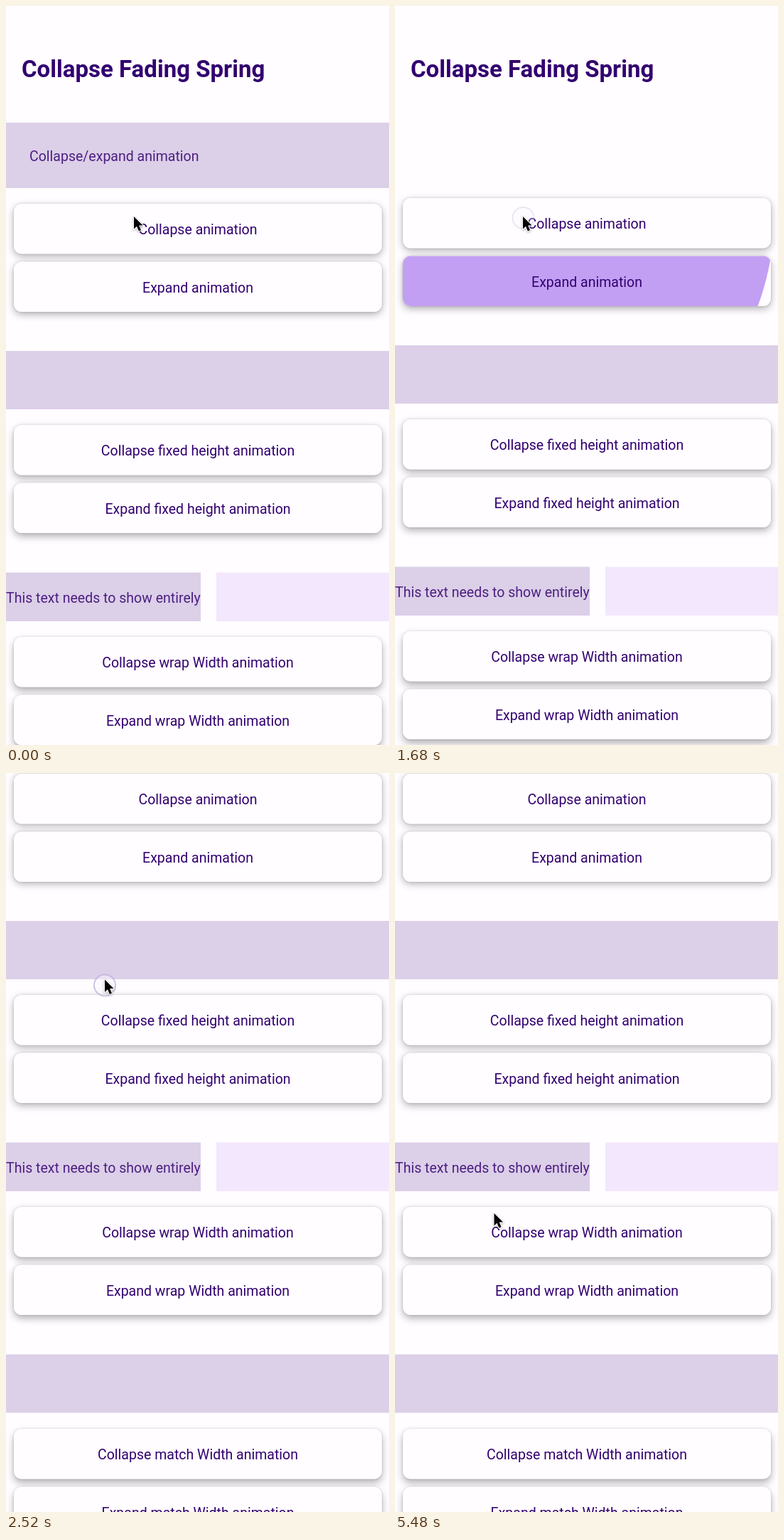
Animation of 539x1039 px, one loop 5.52 s. Source, as an HTML page with a canvas:

```html
<!DOCTYPE html>
<html lang="en">
<head>
<meta charset="utf-8">
<title>Collapse Fading Spring</title>
<style>
html, body { margin: 0; height: 100%; overflow: hidden; background: #fffdff; }
canvas { display: block; width: 539px; height: 1039px; }
</style>
</head>
<body>
<canvas width="539" height="1039"></canvas>
<script>
const W = 539, H = 1039, LOOP = 5520;
const INK = '#320070', PAPER = '#fffdff', PANEL = '#dccfe8', PALE = '#f3e7fd';
const ctx = document.querySelector('canvas').getContext('2d');
const clamp = (v, lo = 0, hi = 1) => Math.min(hi, Math.max(lo, v));
const smooth = u => u * u * (3 - 2 * u);

// Critically damped spring from 0 to 1, stiffness 1500
function spring(ms) {
  if (ms <= 0) return 0;
  const a = Math.sqrt(1500) * ms / 1000;
  return 1 - (1 + a) * Math.exp(-a);
}

// Taps by release time; the ripple starts PRESS ms earlier
const PRESS = 260, NEXT = 210;
const taps = [
  { up: 593, x: 181, y: 298, button: 0 },
  { up: 1578, x: 181, y: 298, button: 1 },
  { up: 3266, x: 140, y: 656, button: 4 },
  { up: 4250, x: 127, y: 725, button: 5 }
];

// Cursor moves: start, end, x, y
const moves = [
  [1700, 2040, 139, 586],
  [2100, 2500, 139, 290.5],
  [2600, 2880, 140, 656],
  [3760, 3970, 126, 724],
  [4600, 5060, 139.5, 619]
];

function cursorAt(t) {
  let x = 180, y = 296;
  for (const [a, b, nx, ny] of moves) {
    const k = smooth(clamp((t - a) / (b - a)));
    x += (nx - x) * k;
    y += (ny - y) * k;
  }
  return { x, y };
}

// Fades out and then shrinks; grows and then fades in
function collapsible(t, close, open) {
  return {
    alpha: clamp(1 - spring(t - close) + spring(t - open - NEXT)),
    size: clamp(1 - spring(t - close - NEXT) + spring(t - open))
  };
}

function rect(x, y, w, h, color) {
  ctx.fillStyle = color;
  ctx.fillRect(x, y, w, h);
}

function text(str, x, y, align = 'left', font = '19.53px') {
  ctx.font = font + ' Roboto, sans-serif';
  ctx.textAlign = align;
  ctx.fillStyle = INK;
  ctx.fillText(str, x, y);
}

function shadow(color, blur, dy) {
  ctx.shadowColor = color;
  ctx.shadowBlur = blur;
  ctx.shadowOffsetY = dy;
}

function button(label, y, index, t) {
  if (y > H + 20 || y < -100) return;
  ctx.save();
  ctx.beginPath();
  ctx.roundRect(11, y, 518, 70.5, 11);
  ctx.fillStyle = PAPER;
  shadow('rgba(0,0,0,.3)', 11, 2.5 + 3.5 * y / H);
  ctx.fill();
  shadow('rgba(0,0,0,.15)', 3, 0);
  ctx.fill();
  shadow('transparent', 0, 0);
  ctx.clip();
  for (const tap of taps) {
    const age = t - tap.up + PRESS;
    if (tap.button !== index || age <= 0) continue;
    ctx.globalAlpha = clamp(age / 75) * clamp(1 - (age - 430) / 300);
    ctx.fillStyle = '#c39ff3';
    ctx.beginPath();
    ctx.arc(tap.x, tap.y, age * 0.97, 0, 7);
    ctx.fill();
  }
  ctx.restore();
  text(label, 270, y + 43, 'center');
}

function pair(name, y, index, t) {
  button(`Collapse ${name}animation`, y, index, t);
  button(`Expand ${name}animation`, y + 81.5, index + 1, t);
}

function touch(x, y, alpha) {
  if (alpha <= 0) return;
  ctx.globalAlpha = alpha;
  ctx.beginPath();
  ctx.arc(x, y, 15, 0, 7);
  ctx.fillStyle = 'rgba(250,246,255,.5)';
  ctx.fill();
  ctx.lineWidth = 2;
  ctx.strokeStyle = 'rgba(180,168,214,.65)';
  ctx.stroke();
  ctx.globalAlpha = 1;
}

const touchAlpha = (t, down, up) => clamp((t - down) / 40) * clamp(1 - (t - up) / 180);

const arrow = new Path2D('M0 0V17.5L4 13.8 6.9 20.5 10 19.2 7.2 12.6H12.6Z');
function pointer({ x, y }) {
  ctx.save();
  ctx.translate(x, y);
  shadow('rgba(0,0,0,.3)', 3, 1);
  ctx.lineWidth = 2.4;
  ctx.lineJoin = 'round';
  ctx.strokeStyle = '#fff';
  ctx.stroke(arrow);
  shadow('transparent', 0, 0);
  ctx.fillStyle = '#000';
  ctx.fill(arrow);
  ctx.restore();
}

function draw(t) {
  const drag = cursorAt(t - 60);
  const dragY = t < 2100 ? 586 : t > 2560 ? 290.5 : drag.y;
  const scroll = Math.round(clamp(586 - dragY - 10, 0, 277));
  const tall = collapsible(t, taps[0].up, taps[1].up);
  const wide = collapsible(t, taps[2].up, taps[3].up);

  rect(0, 0, W, H, PAPER);
  ctx.save();
  ctx.translate(0, -scroll);
  text('Collapse Fading Spring', 22, 100, 'left', 'bold 33px');

  const height = Math.round(92 * tall.size);
  ctx.globalAlpha = tall.alpha;
  rect(0, 164, W, height, PANEL);
  ctx.globalAlpha *= 0.85;
  if (height > 60) text('Collapse/expand animation', 33, 218);
  ctx.restore();

  // Everything below the first panel follows its height
  const top = height - 92 - scroll;
  pair('', top + 278, 0, t);
  rect(0, top + 485, W, 82, PANEL);
  pair('fixed height ', top + 589, 2, t);

  const y = top + 796.5, width = Math.round(274 * wide.size);
  ctx.save();
  ctx.globalAlpha = wide.alpha;
  rect(0, y, width, 68.5, PANEL);
  ctx.globalAlpha *= 0.85;
  if (width > 260) text('This text needs to show entirely', 0, y + 42);
  ctx.restore();
  rect(width + 22, y, W - width - 22, 68.5, PALE);

  pair('wrap Width ', top + 887, 4, t);
  rect(0, top + 1094.5, W, 82, PANEL);
  pair('match Width ', top + 1199, 6, t);

  for (const tap of taps) touch(tap.x - 0.5, tap.y, touchAlpha(t, tap.up - PRESS - 40, tap.up));
  touch(139, dragY, touchAlpha(t, 2080, 2540));
  pointer(cursorAt(t));
}

const start = performance.now();
function frame() {
  draw((performance.now() - start) % LOOP);
  requestAnimationFrame(frame);
}
frame();
</script>
</body>
</html>
```
